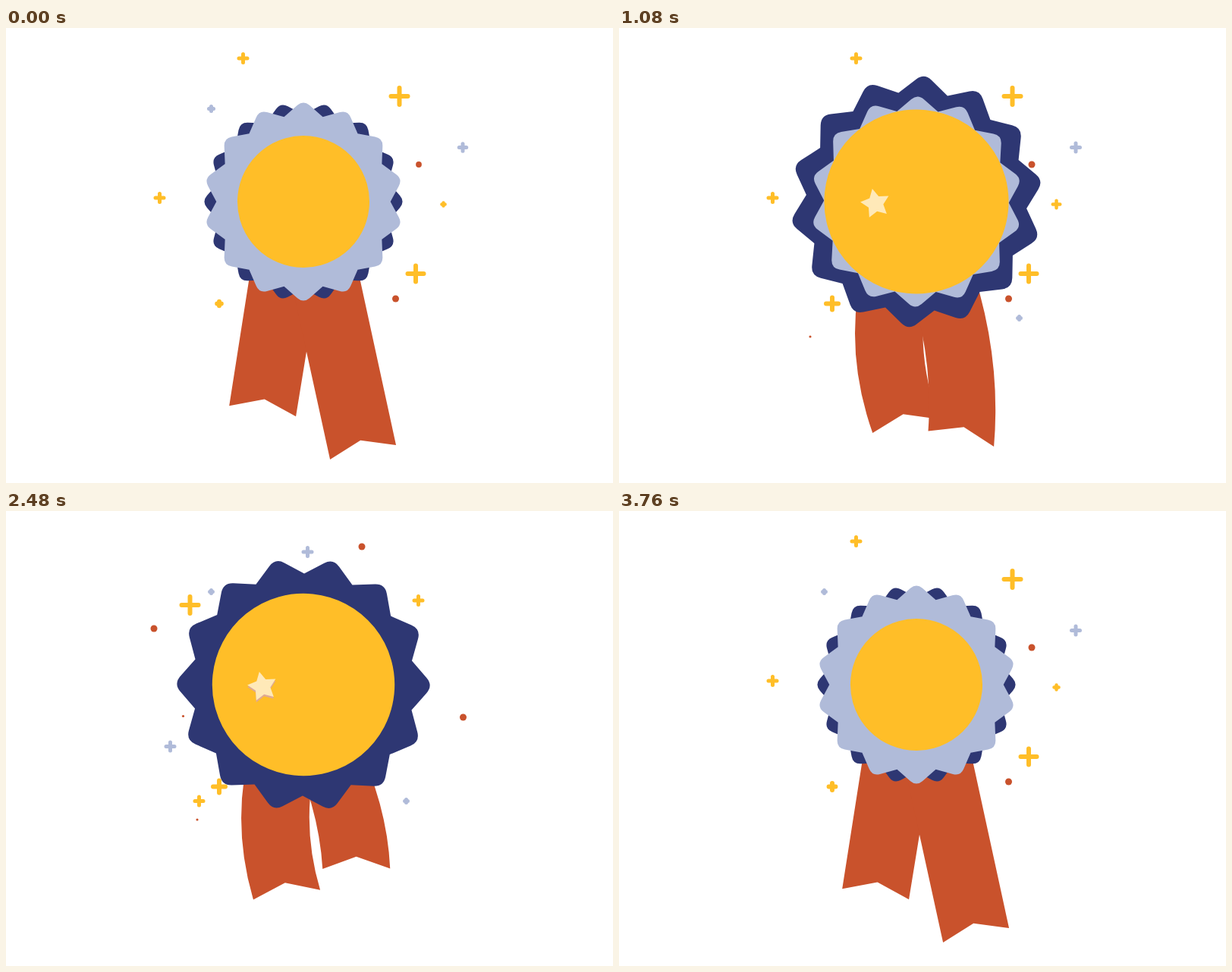
These frames come from a looping animation (800 px wide and 600 px high, 3800 ms). An HTML page:

```html
<!DOCTYPE html>
<html lang="en">
<head>
<meta charset="utf-8">
<title>Award rosette</title>
<style>
html, body { margin: 0; width: 100%; height: 100%; overflow: hidden; background: #fff; }
svg { display: block; width: 800px; height: 600px; }
</style>
</head>
<body>
<svg id="stage" viewBox="0 0 800 600"></svg>
<script>
const LOOP = 3800, STEP = 40, TURN = 1820, FADE = 200;
const CX = 392, CY = 229, TEETH = 14;
const GOLD = '#ffbe28', LAV = '#b0bbd9', NAVY = '#2e3773', RED = '#c9522c', CREAM = '#ffe9b8', SHADE = '#dfa994';

const stage = document.getElementById('stage');
const rad = deg => deg * Math.PI / 180;
const clamp = v => Math.max(0, Math.min(1, v));
const part = (t, from, to) => clamp((t - from) / (to - from));
const smooth = x => x * x * (3 - 2 * x);
const easeOut = (x, power) => 1 - (1 - x) ** power;

// Rises from 0 to 1 at the peak, then falls back to 0.
const bump = (t, from, peak, to) =>
  t < peak ? smooth(part(t, from, peak)) : 1 - smooth(part(t, peak, to));

function set(node, attrs) {
  for (const name in attrs) node.setAttribute(name, attrs[name]);
}

function add(tag, attrs, parent = stage) {
  const node = document.createElementNS('http://www.w3.org/2000/svg', tag);
  set(node, attrs);
  parent.appendChild(node);
  return node;
}

function show(node, on) {
  node.setAttribute('visibility', on ? 'visible' : 'hidden');
}

const polar = (r, a) => [r * Math.sin(a), -r * Math.cos(a)];

// Cog outline with rounded tips and sharp valleys; the tips end at radius 130.
function cogPath() {
  const mix = (p, q, k) => [p[0] + (q[0] - p[0]) * k, p[1] + (q[1] - p[1]) * k];
  const pitch = 2 * Math.PI / TEETH;
  let d = '';
  for (let i = 0; i < TEETH; i++) {
    const left = polar(114.7, (i - 0.5) * pitch);
    const tip = polar(134, i * pitch);
    const right = polar(114.7, (i + 0.5) * pitch);
    d += `${i ? 'L' : 'M'}${left}L${mix(tip, left, 0.31)}Q${tip} ${mix(tip, right, 0.31)}`;
  }
  return d + 'Z';
}

function starPath(r) {
  const pts = [];
  for (let i = 0; i < 10; i++) pts.push(polar(i % 2 ? r * 0.52 : r, rad(i * 36 - 12)));
  return 'M' + pts.join('L') + 'Z';
}

// A ribbon shoots out, then its length and lean ring like a damped spring.
function makeRibbon({ top, start, peak, length, stretch, lean, swing, curl, bow }) {
  const node = add('path', { fill: RED });
  return t => {
    const ring = (1 - part(t, peak, peak + 1000)) ** 2 * Math.cos(Math.PI * (t - peak) / (1260 - peak));
    const bend = bump(t, start, 740, 1060);
    const reach = t < peak
      ? (length + stretch) * easeOut(part(t, start, peak), 2)
      : length + stretch * ring;
    const angle = lean * (1 - swing * ring);
    const x = top + reach * Math.sin(rad(angle)), y = 300 + reach * Math.cos(rad(angle));
    const tilt = rad(curl * bend - angle), c = Math.cos(tilt), s = Math.sin(tilt);
    const edge = (x0, end) => [(x0 + end[0]) / 2 + bow * bend, (300 + end[1]) / 2];
    const a = top - 45.7, b = top + 45.7;
    const l = [x - 44.5 * c, y - 44.5 * s], r = [x + 44.5 * c, y + 44.5 * s];
    const notch = [x + 16 * s, y - 16 * c];
    show(node, t > start);
    set(node, { d: `M${a} 300Q${edge(a, l)} ${l}L${notch}L${r}Q${edge(b, r)} ${b} 300Z` });
  };
}

function makeCog(color, phase, start, spinEnd) {
  const node = add('path', { fill: color, d: cogPath() });
  const peak = start + 290, end = peak + 580;
  return t => {
    const swell = bump(t, start, peak, end);
    const r = t < peak ? 166.3 * swell : 130 + 36.3 * swell;
    const spin = -140 * (1 - part(t, start, spinEnd)) ** 2.62;
    show(node, r > 0);
    set(node, { transform: `translate(${CX} ${CY}) rotate(${spin + phase}) scale(${r / 130})` });
  };
}

// The disc starts as a growing arc, then its stroke thickens until it is solid.
function makeDisc() {
  const node = add('circle', { cx: CX, cy: CY, fill: 'none', stroke: GOLD, 'stroke-linecap': 'round' });
  return t => {
    const size = 87 + 35 * bump(t, 440, 695, 1350);
    const w = 15 + (size - 15) * smooth(part(t, 300, 460));
    const span = 360 * part(t, 70, 360) ** 2;
    const r = size - w / 2, round = 2 * Math.PI * r;
    show(node, span > 0);
    set(node, {
      r, 'stroke-width': w,
      'stroke-dasharray': span < 360 ? `${round * span / 360} ${round}` : 'none',
      transform: `rotate(${96 - span / 2} ${CX} ${CY})`
    });
  };
}

function makeStar() {
  const node = add('g', {});
  const shade = add('path', { d: starPath(20), fill: SHADE, transform: 'translate(0 2.5)' }, node);
  add('path', { d: starPath(20), fill: CREAM }, node);
  return t => {
    const k = Math.min(part(t, 560, 640), 1 - part(t, 860, 940));
    show(node, k > 0);
    set(shade, { opacity: 1 - part(t, 680, 720) });
    set(node, { transform: `translate(338 231.5) scale(${k})` });
  };
}

const rosette = [
  makeRibbon({ top: 371, start: 421, peak: 760, length: 207.8, stretch: 18, lean: -9.1, swing: 1.2, curl: -10, bow: -37 }),
  makeRibbon({ top: 414, start: 524, peak: 885, length: 265.6, stretch: 26, lean: 12.3, swing: 0.85, curl: 22, bow: 28 }),
  makeCog(NAVY, 180 / TEETH, 378, 1260),
  makeCog(LAV, 0, 526, 1564),
  makeDisc(),
  makeStar()
];

function lit(t, spans) {
  let k = 0;
  for (const [from, to] of spans) {
    for (const now of [t, t + LOOP]) k = Math.max(k, Math.min(now - from, to - now) / FADE);
  }
  return clamp(k);
}

function plus(color, x, y, size) {
  const node = add('path', { fill: 'none', stroke: color, 'stroke-linecap': 'round' });
  const w = size > 20 ? 6 : size > 14 ? 5 : 4.5;
  return k => {
    const arm = (size - w) / 2 * k;
    show(node, k > 0);
    set(node, {
      d: `M${x - arm} ${y}H${x + arm}M${x} ${y - arm}V${y + arm}`,
      'stroke-width': w * Math.min(1, k * 4)
    });
  };
}

const gold = (x, y, size = 16) => plus(GOLD, x, y, size);
const lav = (x, y) => plus(LAV, x, y, 16);

function dot(x, y) {
  const node = add('circle', { cx: x, cy: y, fill: RED });
  return k => set(node, { r: 4.5 * k });
}

// Sparkles share a rhythm; the lag makes one open later and close earlier.
const first = lag => [[870, 2250], [2950 + lag, 4000 - 0.45 * lag]];
const second = lag => [[310 + lag, 920], [2250, 3230 - 2 * lag]];
const brief = () => [[645, 1150], [2410, 2950]];
const late = lag => [[2410 + lag, 3430]];

const sparkles = [];
const sparkle = (draw, rhythm, lag = 0) => sparkles.push({ draw, spans: rhythm(lag) });

sparkle(gold(312.5, 40), first, -150);
sparkle(gold(518.5, 90, 28), first, -210);
sparkle(gold(576.5, 232.5, 14), first, 250);
sparkle(gold(202.5, 224), first);
sparkle(gold(540, 324, 27), first);
sparkle(lav(602, 157.5), first, 60);
sparkle(dot(544, 180), first, 60);
sparkle(dot(513.5, 357), first);

sparkle(gold(543.5, 118), second);
sparkle(gold(242.5, 124, 28), second);
sparkle(gold(254.5, 382.5), second, 190);
sparkle(lav(397.5, 54), second, 180);
sparkle(lav(216.5, 310.5), second);
sparkle(dot(469, 47), second, 185);
sparkle(dot(195, 155), second);
sparkle(dot(602.5, 272), second, 120);

sparkle(lav(527.5, 382.5), brief);
sparkle(dot(252, 407), brief);
sparkle(dot(341.5, 73), late, 130);
sparkle(dot(233.5, 270.5), late);
sparkle(lav(270.5, 106.5), () => [[2410, 3400], [3690, 4300]]);
sparkle(gold(281, 363.5, 22), () => [[500, 2700], [3250, 3870]]);

// The rosette folds away until TURN and then unfolds the same way.
function draw(t) {
  const unfold = Math.abs(t - TURN);
  for (const pose of rosette) pose(unfold);
  for (const s of sparkles) s.draw(lit(t, s.spans));
}

const begin = performance.now();
function tick() {
  const t = Math.max(0, performance.now() - begin) % LOOP;
  draw(Math.floor(t / STEP) * STEP);
  requestAnimationFrame(tick);
}
tick();
</script>
</body>
</html>
```
